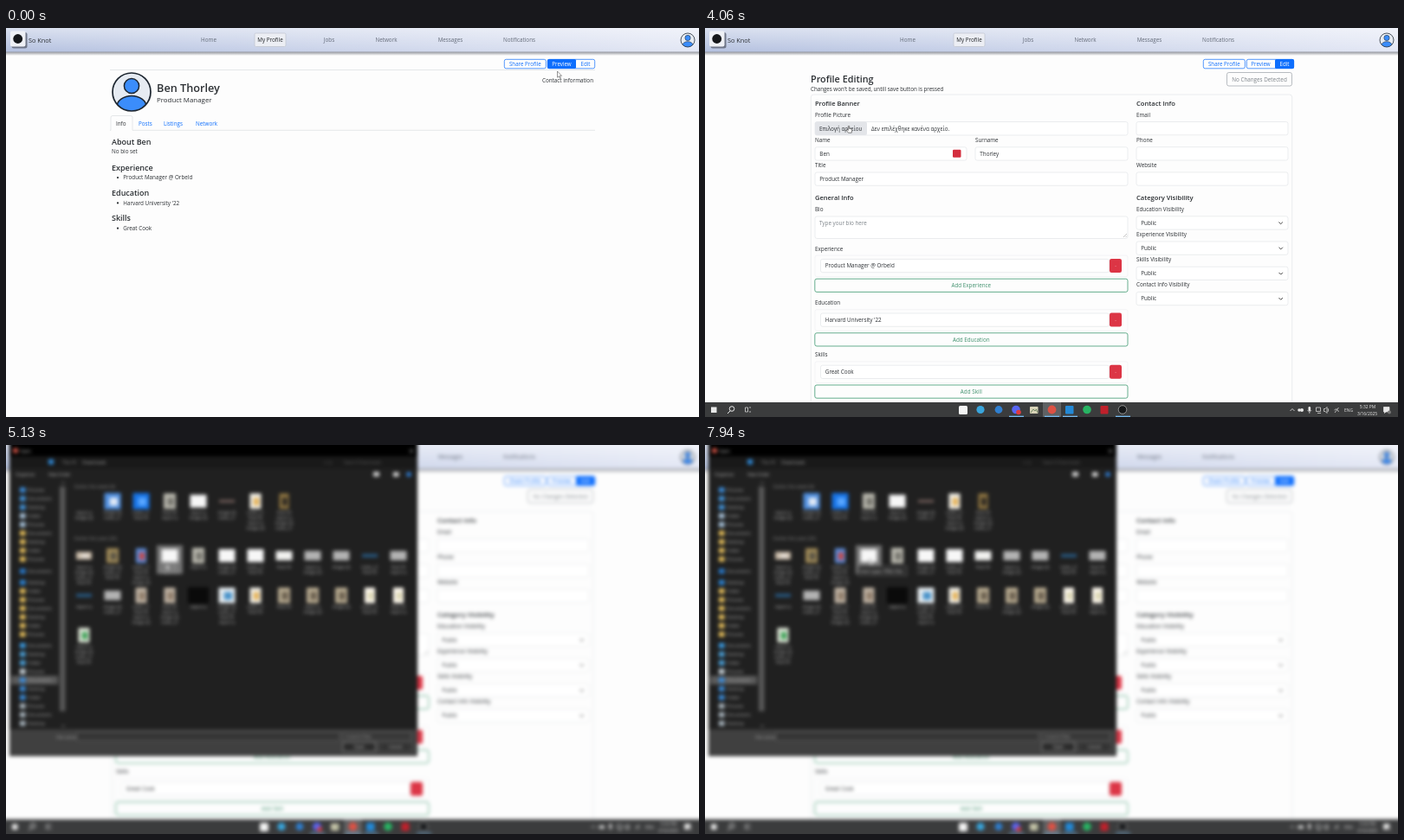
An HTML page that plays this animation: 800 px wide and 450 px high, repeating every 8 s.

```html
<!DOCTYPE html>
<html lang="en">
<head>
<meta charset="utf-8">
<title>Profile editing</title>
<style>
html, body { margin: 0; width: 100%; height: 100%; overflow: hidden; background: #fdfdfd; }
svg { display: block; width: 100vw; height: 100vh; }
text { font-family: "Open Sans", "Noto Sans", sans-serif; white-space: pre; }
</style>
</head>
<body>
<svg id="stage" viewBox="0 0 800 450"></svg>
<script>
const LOOP = 8000;
const BLUE = '#0d6efd', INK = '#2b2f33', LINE = '#e3e5e8';
const at = { edit: 2150, taskbar: 3930, dialog: 4690, loaded: 4810, tooltip: 7700 };

// Drawing helpers
const box = (x, y, w, h, fill, r = 0, stroke = 'none', sw = .7) =>
  `<rect x="${x}" y="${y}" width="${w}" height="${h}" rx="${r}" fill="${fill}" stroke="${stroke}" stroke-width="${sw}"/>`;
const dot = (x, y, r, fill, stroke = 'none', sw = 1) =>
  `<circle cx="${x}" cy="${y}" r="${r}" fill="${fill}" stroke="${stroke}" stroke-width="${sw}"/>`;
const path = (d, stroke, sw = .8, fill = 'none') =>
  `<path d="${d}" fill="${fill}" stroke="${stroke}" stroke-width="${sw}"/>`;
const text = (x, y, s, size = 6.3, fill = INK, anchor = 'start', weight = 400) =>
  `<text x="${x}" y="${y}" font-size="${size}" fill="${fill}" text-anchor="${anchor}" font-weight="${weight}">${s}</text>`;
const mid = (x, y, s, fill = INK, size = 6.3) => text(x, y, s, size, fill, 'middle');
const head = (x, y, s, size) => text(x, y, s, size, INK, 'start', 600);
const group = (id, body, attrs = '') => `<g id="${id}" ${attrs}>${body}</g>`;

function avatar(x, y, r, id) {
  const k = r / 22;
  return `<clipPath id="${id}">${dot(x, y, r, '#000')}</clipPath>` + dot(x, y, r, '#e6ebf2') +
    `<g clip-path="url(#${id})">` +
    `<ellipse cx="${x}" cy="${y + 17 * k}" rx="${17 * k}" ry="${12.5 * k}" fill="#3b8dfb" stroke="#1d2630" stroke-width="${1.5 * k}"/></g>` +
    dot(x, y - 7 * k, 8.6 * k, '#3b8dfb', '#1d2630', 1.5 * k) +
    dot(x, y, r, 'none', '#1d2630', 1.7 * Math.max(k, .45));
}

function header() {
  const links = [['Home', 234], ['Jobs', 373], ['Network', 439], ['Messages', 513], ['Notifications', 592.5]];
  return box(-20, 27, 840, 5, 'url(#shade)') +
    box(-20, -20, 840, 47.5, 'url(#bar)') + box(-20, -20, 840, 47.5, 'url(#gloss)') +
    box(6.5, 5, 18, 18.5, '#6f7688', 2.5) + box(5, 3.5, 17.5, 18, '#eef0f5', 2) + dot(13.7, 12.5, 5.4, '#15171a') +
    text(26, 17, 'So Knot', 7.3) +
    box(287, 6, 36, 15.5, '#eceef4', 1.5, '#c3c7d2', .8) + mid(305, 16, 'My Profile', '#202428') +
    links.map(([s, x]) => mid(x, 16, s, '#636a78')).join('') + avatar(787, 14, 8, 'navClip');
}

function modes(editing) {
  const on = editing ? [658, 22] : [625, 33];
  return box(575.3, 36.3, 48, 10.5, '#fdfdfd', 2, BLUE) + mid(599.3, 43.9, 'Share Profile', BLUE, 6.2) +
    box(625.3, 36.3, 54.4, 10.5, '#fdfdfd', 2, BLUE) + box(on[0], 36, on[1], 11, BLUE, 1.6) +
    mid(641.5, 43.9, 'Preview', editing ? BLUE : '#fff', 6.2) + mid(669, 43.9, 'Edit', editing ? '#fff' : BLUE, 6.2);
}

function profile() {
  const sections = [['Experience', 'Product Manager @ Orbeld'], ['Education', "Harvard University '22"], ['Skills', 'Great Cook']];
  const tabs = [['Posts', 153], ['Listings', 182], ['Network', 219]];
  return path('M120 48.5H680', '#dcdee1', .7) + modes(false) +
    text(678, 63, 'Contact information', 6.3, INK, 'end') +
    avatar(145, 74, 22, 'bigClip') + head(174, 73.5, 'Ben Thorley', 12.7) + text(174, 85.6, 'Product Manager', 7.9) +
    path('M120 118.3H121V103.5q0-2 2-2H144q2 0 2 2V118.3H680', '#dcdee1', .7) +
    text(127, 112.6, 'Info', 6.3) + tabs.map(([s, x]) => text(x, 112.6, s, 6.3, BLUE)).join('') +
    head(122, 135, 'About Ben', 9) + text(122, 145.3, 'No bio set') +
    sections.map(([h, s], i) => {
      const y = 164.5 + i * 29.3;
      return head(122, y, h, 9) + dot(129, y + 8.6, 1.1, INK) + text(135.3, y + 10.8, s);
    }).join('');
}

const input = (x, y, w, s = '', h = 15.3) => box(x, y, w, h, '#fff', 2.2, LINE) + text(x + 5.3, y + 10, s);

function listEditor(y, label, value) {
  return text(127, y, label) + box(127, y + 5.5, 361, 24.5, '#fdfdfd', 2, '#eff0f2') +
    input(133.5, y + 9.8, 333, value) + box(467, y + 9.3, 14, 16, '#dc3545', 2.2) + mid(474, y + 19.4, '-', '#f6c6cb', 5) +
    box(126.8, y + 32.6, 361.2, 15.2, '#fdfdfd', 2.2, '#3f9a72', .8) + mid(307.3, y + 42.5, 'Add ' + label.replace('Skills', 'Skill'), '#3d8f6b');
}

function editor() {
  const contact = ['Email', 'Phone', 'Website'];
  const views = ['Education', 'Experience', 'Skills', 'Contact Info'];
  return modes(true) + head(122, 63, 'Profile Editing', 10.8) +
    text(122, 73.2, "Changes won't be saved, untill save button is pressed", 6.2) +
    box(602.5, 51.5, 75, 15.5, '#fdfdfd', 2.2, '#9aa0a6') + mid(640, 61.6, 'No Changes Detected', '#7b8187') +
    box(122.3, 77, 555.4, 420, 'none', 3, LINE) +
    head(127, 90, 'Profile Banner', 7.5) + text(127, 102.6, 'Profile Picture') +
    box(127, 108.5, 361, 15.5, '#fff', 2.2, LINE) + group('fileBtn', box(127, 108.5, 60, 15.5, '#e3e5e9', 2)) +
    text(132, 118.7, 'Επιλογή αρχείου') + text(192, 118.7, 'Δεν επιλέχθηκε κανένα αρχείο.') +
    text(127, 131.8, 'Name') + input(127, 137.8, 175, 'Ben') + box(286, 140.8, 9.5, 9, '#d32d3d', 1.2) +
    text(312, 131.8, 'Surname') + input(312, 137.8, 176, 'Thorley') +
    text(127, 161, 'Title') + input(127, 167, 361, 'Product Manager') +
    head(127, 199, 'General Info', 7.5) + text(127, 211.8, 'Bio') +
    box(127, 218, 361, 25.5, '#fff', 2.2, LINE) + text(132, 228, 'Type your bio here', 6.3, '#7c8288') +
    path('M483 242l4-4M485.500 242l1.500-1.500', '#888', .5) +
    listEditor(257.6, 'Experience', 'Product Manager @ Orbeld') +
    listEditor(320.2, 'Education', "Harvard University '22") +
    listEditor(380.4, 'Skills', 'Great Cook') +
    head(498, 90, 'Contact Info', 7.6) +
    contact.map((s, i) => text(498, 102.6 + i * 29.2, s) + input(498, 108.5 + i * 29.2, 175)).join('') +
    head(498, 199, 'Category Visibility', 7.6) +
    views.map((s, i) => {
      const y = 211.8 + i * 29.2;
      return text(498, y, s + ' Visibility') + input(498, y + 6, 175, 'Public') + path(`M662.500 ${y + 12.7}l2.200 2.200l2.200-2.200`, '#444', 1);
    }).join('');
}

function taskbar() {
  const w = '#e8e8e8';
  return box(-20, 433, 840, 40, '#3b3c3d') + box(390, 433, 21, 40, '#5f6163') +
    box(7, 438.5, 6.5, 6.5, w) + dot(31, 440.5, 2.8, 'none', w) + path('M29 443l-3 3', w, 1) +
    path('M46.500 439h3v5h-3zM51 439h2M51 444h2', w, .7) +
    box(293, 437, 10, 10, '#f4f4f4', 1.5) + dot(318, 441.500, 4.6, '#39a5dc') + dot(339, 441.500, 4.4, '#2f7fd0') +
    dot(359, 441.500, 4.8, '#5865f2') + dot(362, 444.500, 2.8, '#e03a3e') +
    box(375, 438, 9.5, 8, '#d8d3b8', .8) + path('M376 445l3-4l2 2l1.500-2l1.500 4', '#5a7750', .8) +
    dot(400.5, 441.500, 4.9, '#dd5144') + box(416, 437, 9.5, 9.5, '#2389d7', 1) + dot(441, 441.500, 4.8, '#28b463') +
    box(456.5, 437, 9, 9.5, '#c0202b', 1) + dot(482, 441.500, 4.8, '#16181a', '#aaa', .8) +
    [351, 392, 413, 474].map(x => box(x, 448.7, 17, 1.3, '#76b9ed')).join('') +
    path('M675.500 443l2.500-2.500l2.500 2.500', w) + dot(686, 442, 1.8, w) + dot(689, 442, 2, w) +
    box(696.5, 438, 2.6, 5.2, w, 1.3) + path('M695.500 442q2.300 4 4.600 0M697.800 444v2', w, .6) +
    path('M705.500 439h5v4.500h-5zM707 445.500h4', w, .7) +
    path('M714.500 440.500h1.500l2-2v7l-2-2h-1.500zM719 440q1.500 2 0 4', w, .7) + path('M727 445l4.500-6M726.500 442q3-3 5 2', w, .7) +
    mid(743, 443.6, 'ENG', w, 5) + mid(765, 440, '5:32 PM', w, 4.9) + mid(764.5, 448, '3/16/2025', w, 4.9) +
    path('M783.500 438.500h6.500v5.500h-4l-1.500 1.500v-1.500h-1z', w, .7, w) + dot(790, 444.500, 2, '#777');
}

// Thumbnails: [width, height, fill, accent]
const kinds = {
  '-': [0, 0, 'none'], k: [24, 19, '#0a0a0a'], b: [19, 19, '#4f8fe0', '#dfe8f5'], B: [19, 19, '#1673e6', '#58a6ff'],
  g: [14, 18, '#b9b8ae', '#77766f'], w: [19, 15, '#f7f7f7'], r: [18, 3, '#75605c'],
  d: [13, 18, '#f1efe8', '#e5b45c'], f: [11, 18, '#8c7340', '#2a2622'], s: [18, 9, '#cbbca9', '#e5dfd8'],
  m: [14, 17, '#a08a58', '#5b5546'], p: [12, 17, '#5b8ad6', '#c64848'], W: [19, 11, '#f0f0ee'],
  G: [19, 11, '#b3b3b3'], l: [18, 4, '#27567d'], t: [13, 18, '#bfb3a4', '#8f7c69'],
  c: [19, 18, '#e8eef2', '#4c94c9'], e: [14, 18, '#b7aa90', '#6c6150'], D: [12, 18, '#fffaf0', '#d9d4b0'], n: [13, 17, '#dfe5d8', '#44a45c']
};
const rows = [
  { y: 65, items: '-bBgwrdf', lines: '22222244' },
  { y: 128, items: 'smpwgwwWGGlG', lines: '434212212122' },
  { y: 174, items: 'lGttkcdeeeDD', lines: '124414212122' },
  { y: 220, items: 'n', lines: '4' }
];
const words = ['report a', 'image (2)', 'notes_v1', 'final 03'];
const tileX = i => 90 + i * 33;

function thumbs() {
  return rows.map(({ y, items, lines }) => [...items].map((key, i) => {
    const [w, h, fill, accent] = kinds[key], x = tileX(i);
    let out = w ? box(x - w / 2, y - h / 2, w, h, fill) : '';
    if (accent) out += box(x - w * .18, y - h * .22, w * .5, h * .5, accent);
    for (let n = 0; n < +lines[i]; n++) out += mid(x, y + 14.5 + n * 6.2, words[(i + n) % 4], '#b9b9b9', 4.9);
    return out;
  }).join('')).join('');
}

function sidebar() {
  const list = [];
  const add = (y, n, color) => { for (let i = 0; i < n; i++) list.push([y + i * 10, color]); };
  add(52, 1, '#3b8bd8'); add(62, 2, '#4393d9'); add(82, 2, '#a9c4dc'); add(102, 4, '#e3bd5b');
  add(146, 1, '#2878c8'); add(159, 1, '#2d83d2'); add(169, 6, '#e3bd5b');
  add(232, 1, '#3b9ae0'); add(242, 2, '#4ba0d8'); add(262, 1, '#c8d4dc'); add(272, 3, '#3b8bd8'); add(302, 3, '#a8b4bd');
  return box(6, 267, 54, 10, '#5a5a5a') +
    list.map(([y, c], i) => box(16, y - 3, 6.5, 6, c) + text(25, y + 2, ['Pictures', 'Documents', 'Desktop', 'Folder'][i % 4], 5.2, '#aaa')).join('');
}

function dialog() {
  const white = box(4, 13, 471, 14, '#fff') + box(58, 334, 22.5, 5.5, '#fff') + box(82, 332, 303, 10, '#fff') +
    box(389, 332, 78.5, 10, '#fff') + box(389, 344, 37.5, 10.500, '#fff') + box(431, 344, 37, 10.500, '#fff') + box(467, 352, 8, 8, '#fff') +
    mid(272.5, 52.3, 'Working on it...', '#fff', 5);
  const full = box(4, 13, 471, 14, '#191919') + box(49, 16.5, 6, 6, '#2f88d6') +
    text(65, 22, 'This PC', 5, '#999') + text(88, 22, 'Downloads', 5.3, '#b8b8b8') +
    text(368, 22, 'v  o', 5, '#777') + text(390, 22, 'Search Downloads', 5, '#666') +
    text(11, 36, 'Organize', 5.3, '#bbb') + text(49, 36, 'New folder', 5, '#bbb') + box(424, 31, 7, 5.5, '#ccc') +
    sidebar() + text(79, 50, 'Earlier this week (8)', 5.2, '#8d8d8d') + text(79, 110, 'Earlier this year (25)', 5.3, '#8d8d8d') +
    group('hover', box(0, 0, 30, 1, '#747474')) + thumbs() +
    group('tip', box(177, 140, 56, 11, '#2b2b2b', 0, '#777', .6) + text(179, 147.5, 'Item type: PNG File', 5.5, '#ddd')) +
    text(58, 339.5, 'File name:', 5, '#aaa') + box(82, 332, 303, 10, '#353535', 0, '#666', .7) +
    box(389, 332, 78.5, 10, '#383838', 0, '#666', .7) + text(392, 339, 'Custom Files', 5, '#aaa') +
    box(389, 344, 37.500, 10.500, '#2b2b2b', 0, '#888', .9) + mid(408, 351, 'Open', '#ccc', 5) +
    box(431, 344, 37, 10.500, '#333', 0, '#555', .6) + mid(449.5, 351, 'Cancel', '#bbb', 5);
  return group('back', box(4, -20, 471, 380, '#202020') + box(4, 329, 471, 31, '#404040')) +
    box(4, -20, 471, 33, '#000') + dot(11, 6.5, 3, '#d9584a') + text(16, 8.7, 'Open', 5, '#ccc') +
    path('M466 5l4 4M470 5l-4 4', '#ddd', .7) + box(447, 31.500, 6.500, 5, '#dcdcdc') + dot(465, 34, 2.800, '#2f7fd8') +
    box(62, 48, 6.500, 260, '#585858') + path('M64 45l2-2l2 2M64 324l2 2l2-2', '#aaa', .7) +
    group('blank', white) + group('full', full);
}

const arrow = path('M0 0V7.200L1.700 5.700L2.800 8.200L3.900 7.700L2.800 5.300H5Z', '#333', .5, '#fff');
const hand = path('M-.7 .6Q0-.4 .7 .6V3.300L3.400 4Q4 4.200 3.800 5L3.200 8.200H-.6L-2.900 5.200Q-2.600 4.100-1.600 4.800L-.7 5.500Z', '#222', .55, '#fff');
const grad = (id, dir, a, b) => `<linearGradient id="${id}" ${dir}>${a}${b}</linearGradient>`;
const stop = (o, c, a = 1) => `<stop offset="${o}" stop-color="${c}" stop-opacity="${a}"/>`;
const down = 'x1="0" y1="0" x2="0" y2="1"';

const stage = document.getElementById('stage');
stage.innerHTML = '<defs>' +
  grad('bar', '', stop(0, '#b3c0df'), stop(1, '#e4e8f5')) +
  grad('gloss', down, stop(.42, '#fff', .5), stop(1, '#fff', 0)) +
  grad('shade', down, stop(0, '#454a57', .65), stop(1, '#454a57', 0)) +
  '<filter id="soft" filterUnits="userSpaceOnUse" x="-20" y="-20" width="840" height="490" color-interpolation-filters="sRGB"><feGaussianBlur stdDeviation="1.9"/></filter></defs>' +
  group('scene', box(-20, -20, 840, 500, '#fdfdfd') + group('profile', profile()) + group('editor', editor()) +
    header() + group('taskbar', taskbar()) + group('dialog', dialog()) +
    group('cursor', group('arrow', arrow) + group('hand', hand)));

const $ = id => document.getElementById(id);
const show = (id, on) => $(id).setAttribute('display', on ? 'inline' : 'none');

// Pointer stops: time, x, y
const track = [[0, 636.5, 50], [500, 636.5, 50], [1500, 667, 40], [2350, 667, 40], [3450, 166, 113], [4250, 166, 113],
  [4650, 169, 123], [4950, 169, 123], [5450, 223, 172], [6050, 223, 172], [6800, 157, 136], [7150, 157, 136], [7600, 190, 132], [LOOP, 190, 132]];

function pointer(t) {
  const i = track.findIndex((p, n) => n && t <= p[0]);
  const [t0, x0, y0] = track[i - 1], [t1, x1, y1] = track[i];
  const u = (t - t0) / (t1 - t0), k = u * u * (3 - 2 * u);
  return [x0 + (x1 - x0) * k, y0 + (y1 - y0) * k];
}

const inside = (x, y, l, t, r, b) => x >= l && x <= r && y >= t && y <= b;

function hoverTile(x, y) {
  const row = rows.find(r => y > r.y - 13 && y < r.y + 34);
  const col = Math.round((x - 90) / 33);
  const on = row && col >= 0 && col < row.items.length;
  show('hover', on);
  if (!on) return;
  const h = 27 + 6.2 * (row.lines[col] - 1);
  $('hover').setAttribute('transform', `translate(${tileX(col) - 15} ${row.y - 12}) scale(1 ${h})`);
}

function draw(t) {
  const editing = t >= at.edit, open = t >= at.dialog, loaded = t >= at.loaded;
  const [x, y] = pointer(t);
  const onFile = editing && inside(x, y, 127, 108, 187, 122);
  const pointing = !open && (onFile || inside(x, y, 575, 36, 680, 47));
  show('profile', !editing);
  show('editor', editing);
  show('fileBtn', onFile || open);
  show('taskbar', t >= at.taskbar);
  show('dialog', open);
  show('blank', !loaded);
  show('full', loaded);
  show('tip', t >= at.tooltip);
  show('arrow', !pointing);
  show('hand', pointing);
  $('back').setAttribute('opacity', loaded ? 1 : .95);
  $('cursor').setAttribute('transform', `translate(${x} ${y})`);
  if (loaded) {
    hoverTile(x, y);
    $('scene').setAttribute('filter', 'url(#soft)');
  } else $('scene').removeAttribute('filter');
}

const start = performance.now();
function tick() {
  draw((performance.now() - start) % LOOP);
  requestAnimationFrame(tick);
}
tick();
</script>
</body>
</html>
```
